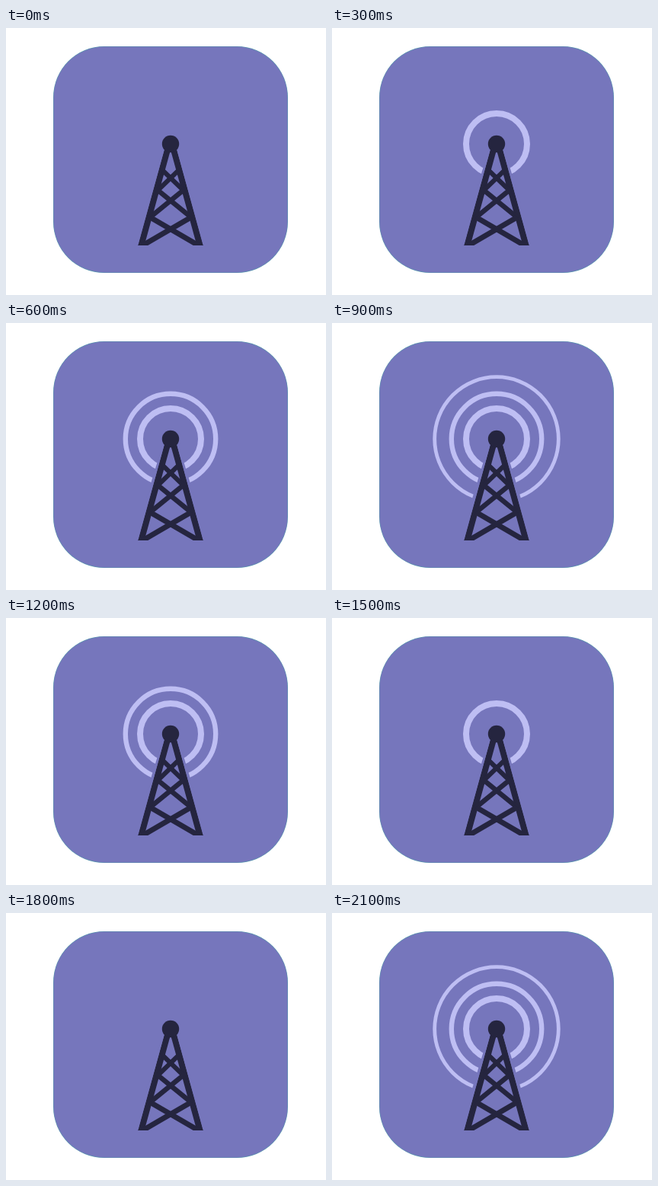
Write an HTML page with a canvas that moves like this. It is 420 by 350 pixels and loops after 2.4 s.

```html
<!DOCTYPE html>
<html lang="en">
<head>
<meta charset="utf-8">
<title>Radio tower</title>
<style>
  html, body { margin: 0; width: 100%; height: 100%; overflow: hidden; background: #fff; }
  canvas { display: block; }
</style>
</head>
<body>
<canvas id="stage" width="420" height="350"></canvas>
<script>
const ctx = document.getElementById('stage').getContext('2d');
const STEP = 300;
const RINGS_SHOWN = [0, 1, 2, 3, 2, 1, 0, 3];
const RINGS = [[40, 8], [59.2, 6.4], [81.3, 4.8]]; // radius, line width
const CX = 216, CY = 152, FOOT = 285;
const PURPLE = '#7676bc', LIGHT = '#bebef3', DARK = '#25253f';

function panel(inset, color) {
  ctx.fillStyle = color;
  ctx.beginPath();
  ctx.roundRect(62 + inset, 24 + inset, 308 - 2 * inset, 297 - 2 * inset, 67 - inset);
  ctx.fill();
}

function polygon(points) {
  ctx.beginPath();
  points.forEach(([x, y]) => ctx.lineTo(x, y));
  ctx.closePath();
  ctx.fill();
}

function rings(count) {
  ctx.strokeStyle = LIGHT;
  for (const [r, w] of RINGS.slice(0, count)) {
    ctx.lineWidth = w;
    ctx.beginPath();
    ctx.arc(CX, CY, r, 0, Math.PI * 2);
    ctx.stroke();
  }
  // open the rings around the tower
  ctx.fillStyle = PURPLE;
  polygon([[207, 155], [225, 155], [251, 240], [181, 240]]);
}

// a bar and its mirror image about the tower axis
function bars(x1, y1, x2, y2, width) {
  ctx.lineWidth = width;
  for (const side of [-1, 1]) {
    ctx.beginPath();
    ctx.moveTo(CX + side * x1, y1);
    ctx.lineTo(CX + side * x2, y2);
    ctx.stroke();
  }
}

function tower() {
  ctx.save();
  ctx.beginPath();
  ctx.moveTo(CX - 7, 155);
  ctx.lineTo(CX + 7, 155);
  ctx.lineTo(CX + 43, FOOT);
  ctx.lineTo(CX - 43, FOOT);
  ctx.closePath();
  ctx.clip();
  ctx.strokeStyle = DARK;
  bars(2, 152, 40.5, 292, 8);
  bars(-10, 187, 18, 214, 6);
  bars(-20, 210, 28, 249, 6.5);
  bars(-27, 248, 41, 287.5, 7);
  ctx.restore();
  ctx.fillStyle = DARK;
  ctx.beginPath();
  ctx.arc(CX, CY, 11.2, 0, Math.PI * 2);
  ctx.fill();
}

function draw(time) {
  const step = Math.floor(time / STEP) % RINGS_SHOWN.length;
  ctx.clearRect(0, 0, 420, 350);
  panel(0, '#5796ae');
  panel(0.6, PURPLE);
  rings(RINGS_SHOWN[step]);
  tower();
}

const start = performance.now();
function loop() {
  draw(performance.now() - start);
  requestAnimationFrame(loop);
}
loop();
</script>
</body>
</html>
```
